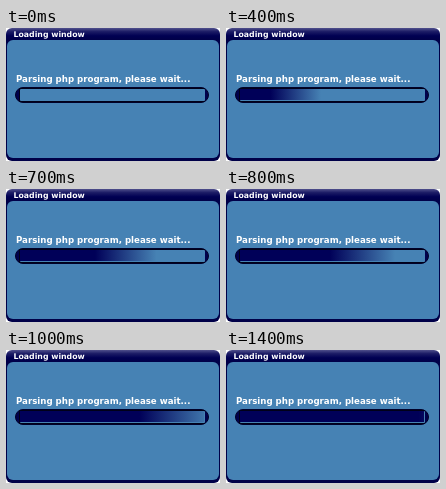
An HTML page for the animation above (1.5 s loop, 214x133 px).

```html
<!DOCTYPE html>
<html lang="en">
<head>
<meta charset="utf-8">
<title>Loading window</title>
<style>
  html, body { margin: 0; width: 100%; height: 100%; overflow: hidden; background: #fff; }
  svg { display: block; width: 100vw; height: 100vh; }
  text { font-family: "DejaVu Sans", Verdana, sans-serif; font-weight: 700; fill: #fff; }
</style>
</head>
<body>
<svg viewBox="0 0 214 133" preserveAspectRatio="none">
  <defs>
    <linearGradient id="frame" gradientUnits="userSpaceOnUse" x1="0" y1="0" x2="0" y2="12">
      <stop offset="0" stop-color="#50508c"/>
      <stop offset=".3" stop-color="#1c1c66"/>
      <stop offset=".65" stop-color="#000052"/>
      <stop offset="1" stop-color="#000048"/>
    </linearGradient>
    <linearGradient id="fade" gradientUnits="userSpaceOnUse" y1="0" y2="0">
      <stop offset="0" stop-color="#000058"/>
      <stop offset="1" stop-color="#4682b4"/>
    </linearGradient>
  </defs>
  <rect width="214" height="133" rx="6" fill="url(#frame)"/>
  <rect x="1" y="12" width="212" height="118" rx="6" fill="#4682b4"/>
  <text x="7.5" y="9" font-size="7.8">Loading window</text>
  <text x="10" y="54" font-size="8.65">Parsing php program, please wait...</text>
  <rect x="9.5" y="59.5" width="193" height="15" rx="7.5" fill="#00004c" stroke="#000028"/>
  <rect x="13" y="60" width="186" height="14" rx="2" fill="#000018"/>
  <rect x="14" y="61" width="185" height="12" rx="1" fill="#4682b4"/>
  <rect id="bar" x="14" y="61" width="184" height="11" fill="url(#fade)"/>
</svg>
<script>
  const LOOP = 1500, STEP = 100;
  const bar = document.getElementById("bar");
  const fade = document.getElementById("fade");

  // The dark edge advances more slowly than the light one, so the fade widens.
  function draw(time) {
    const step = Math.floor((time % LOOP) / STEP);
    bar.setAttribute("visibility", step ? "visible" : "hidden");
    fade.setAttribute("x1", 15 + 14.8 * (step - 2));
    fade.setAttribute("x2", 58 + 18.5 * (step - 2));
  }

  const start = performance.now();
  function tick() {
    draw(performance.now() - start);
    requestAnimationFrame(tick);
  }
  tick();
</script>
</body>
</html>
```
